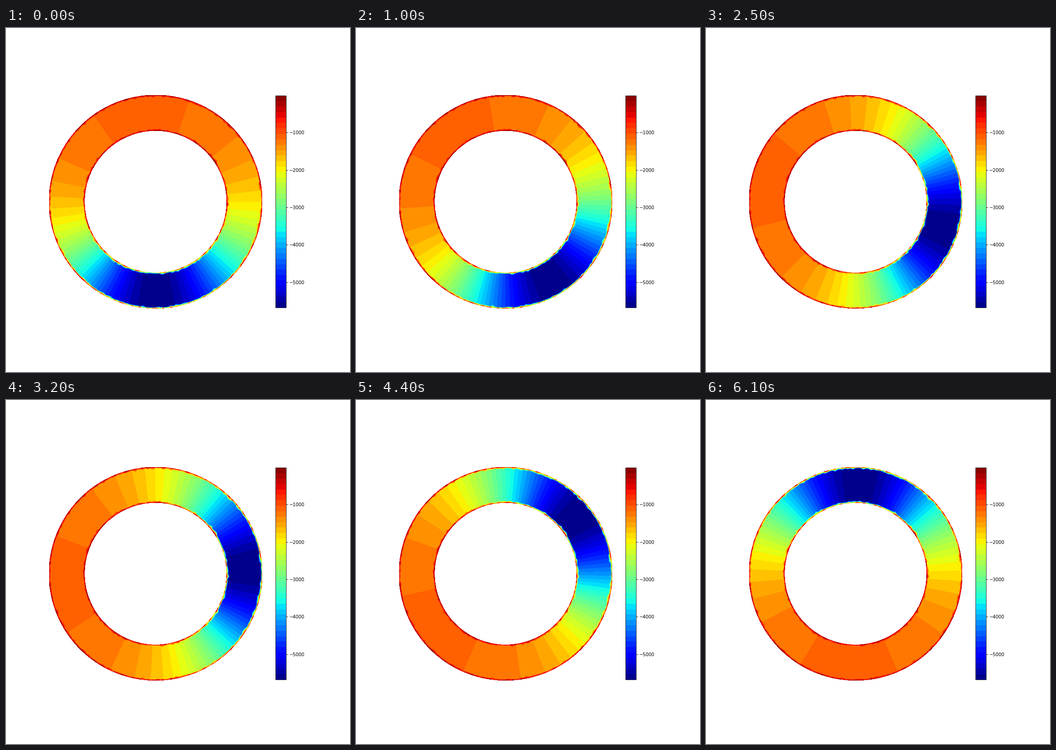
These frames come from a looping animation (748x748 px, 6.2 s). A matplotlib script:

```python
import numpy as np
import matplotlib.pyplot as plt
from matplotlib.animation import FuncAnimation

FRAMES, INTERVAL = 62, 100
SIZE, DPI = 748, 72
R_IN, R_OUT = 154.6, 231.9          # ring radii in pixels
BASE, DEPTH, FOCUS = -1028, 4650, 1.82
LEVELS = np.linspace(-5684, -14, 40)

rng = np.random.default_rng(7)
theta = np.linspace(0, 360, 1441)


def rough(nodes, low, spread, power):
    """Random profile around the ring, linear between evenly spaced nodes."""
    knots = np.arange(nodes) * 360 / nodes
    heights = low + spread * rng.random(nodes) ** power
    return np.interp(theta, knots, heights, period=360)


def rim(nodes):
    """Boundary layer: its thickness in pixels and the share of the field at the edge."""
    return rough(nodes, 1.8, 4.5, 3), rough(nodes, 0.05, 0.5, 1)


gap_in, share_in = rim(170)
gap_out, share_out = rim(256)
radius = np.array([np.full_like(theta, R_IN),
                   R_IN + gap_in,
                   R_OUT - gap_out,
                   np.full_like(theta, R_OUT)])
X = radius * np.cos(np.radians(theta))
Y = radius * np.sin(np.radians(theta))


def field(i):
    """Cold spot climbing the right side, its tail leaning less and less."""
    center = -89.7 + 2.91 * i
    lean = np.radians(4.5 * (1 - i / 50))
    rel = np.radians(theta - center)
    angle = rel - lean * (1 - np.cos(rel))
    ring = BASE - DEPTH * np.exp(FOCUS * (np.cos(angle) - 1))
    return np.array([ring * share_in, ring, ring, ring * share_out])


def contour(i):
    return ax.contourf(X, Y, field(i), levels=LEVELS, cmap="jet")


fig, ax = plt.subplots(figsize=(SIZE / DPI, SIZE / DPI), dpi=DPI)
ax.set_aspect("equal")
ax.axis("off")
shown = contour(0)
fig.colorbar(shown, ax=ax, shrink=0.8, ticks=range(-5000, 0, 1000))
ax.set_xlim(-R_OUT, R_OUT)
ax.set_ylim(-R_OUT, R_OUT)


def update(i):
    global shown
    shown.remove()
    shown = contour(i)
    return [shown]


anim = FuncAnimation(fig, update, frames=FRAMES, interval=INTERVAL,
                     init_func=lambda: [], repeat=True, repeat_delay=0)
plt.show()
```
